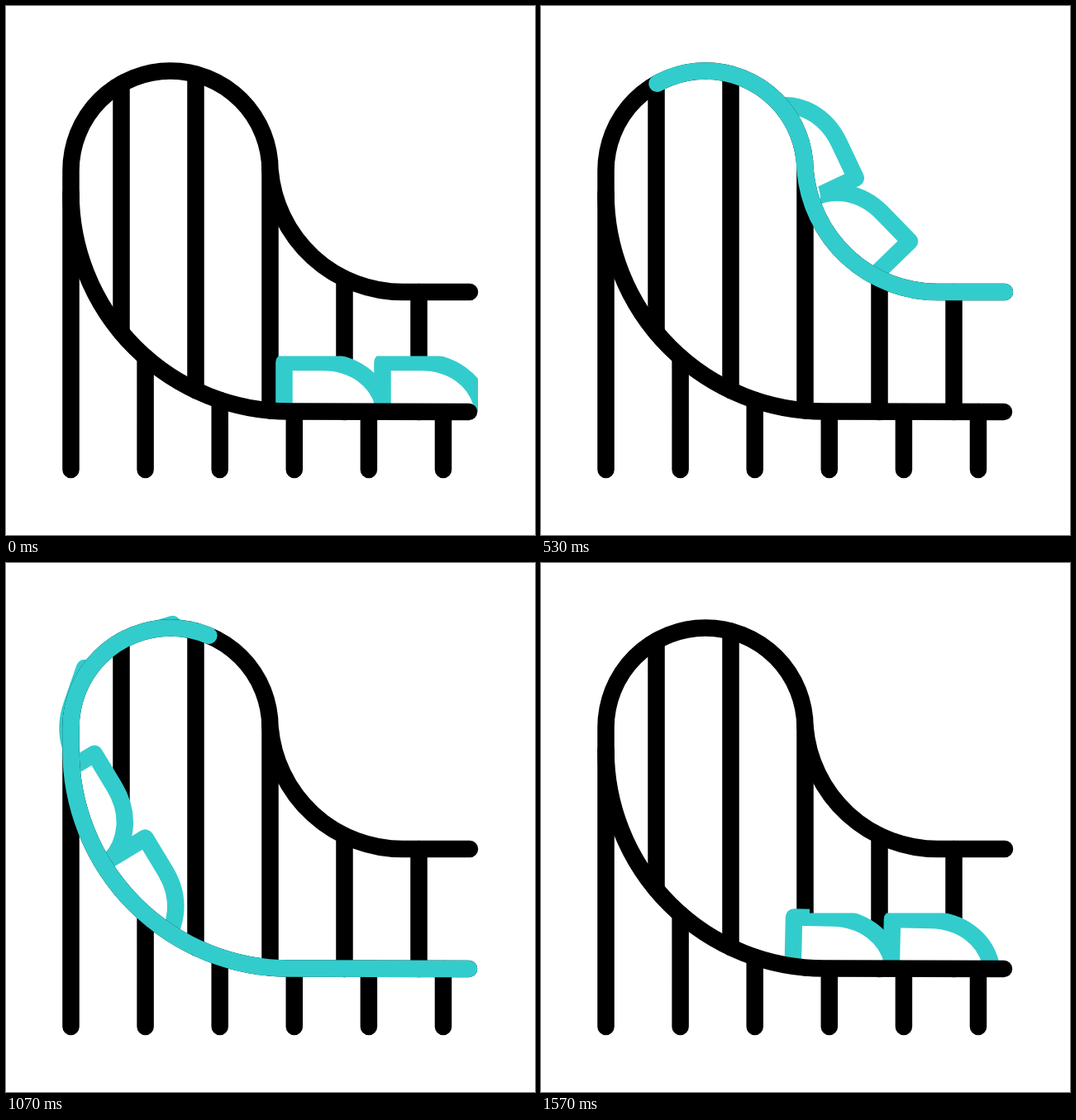
An HTML page with a canvas that plays this animation: 640x640 px, repeating every 1630 ms.

```html
<!DOCTYPE html>
<html>
<head>
<meta charset="utf-8">
<title>Roller coaster</title>
<style>
html, body { margin: 0; width: 100%; height: 100%; overflow: hidden; background: #fff; }
canvas { display: block; width: 640px; height: 640px; }
</style>
</head>
<body>
<canvas id="stage" width="640" height="640"></canvas>
<script>
const ctx = document.getElementById('stage').getContext('2d');
const { PI, sin, cos, exp, sqrt, min, max } = Math;
const LOOP = 1630, TEAL = '#33cccc', LINE = 20.5;

// Track sections: top straight, valley arc, loop arc, drop, base arc, base straight
const VALLEY = 161, TOP = 120.5, BASE = 264.5, LEAN = 1.4837;
const S1 = 81, S2 = S1 + VALLEY * LEAN, S3 = S2 + TOP * PI, S4 = S3 + 27,
      S5 = S4 + BASE * PI / 2, LENGTH = S5 + 217;

const upper = new Path2D();
upper.moveTo(561, 346);
upper.lineTo(480, 346);
upper.arc(480, 185, VALLEY, PI / 2, PI / 2 + LEAN);
upper.arc(199, 199, TOP, 0, PI, true);
upper.lineTo(78.5, 226);
const track = new Path2D(upper);
track.arc(343, 226, BASE, PI, PI / 2, true);
track.lineTo(560, 491);

// Side of the track on which each train shows
const outside = new Path2D(upper);
for (const [x, y] of [[0, 226], [0, 0], [566, 0], [566, 346]]) outside.lineTo(x, y);
const inside = new Path2D(track);
for (const [x, y] of [[571, 491], [571, 423.5], [325, 423.5], [325, 230]]) inside.lineTo(x, y);

// Posts hang between the two levels of the track and stand below the lower one
const upperY = x => x < 319 ? 199 - sqrt(TOP ** 2 - (x - 199) ** 2)
  : x < 480 ? 185 + sqrt(VALLEY ** 2 - (480 - x) ** 2) : 346;
const lowerY = x => x < 343 ? 226 + sqrt(BASE ** 2 - (343 - x) ** 2) : 491;
const posts = new Path2D();
function addPost(x, top, bottom) {
  posts.moveTo(x, top);
  posts.lineTo(x, bottom);
}
for (let i = 0; i < 5; i++) {
  const x = 139.5 + 90 * i;
  addPost(x, upperY(x), lowerY(x));
}
for (let i = 0; i < 6; i++) {
  const x = 78.5 + 90.1 * i;
  addPost(x, lowerY(x), 561);
}

// Rear foot at the origin, travelling right
const car = new Path2D('M0 0V-60H47C85 -60 112 -38 120 -10L123 0');

// Position and heading at a distance along the track
function trackPoint(s) {
  if (s < S1) return [561 - s, 346, PI];
  if (s < S2) {
    const a = (s - S1) / VALLEY;
    return [480 - VALLEY * sin(a), 185 + VALLEY * cos(a), PI + a];
  }
  if (s < S3) {
    const a = (s - S2) / TOP;
    return [199 + TOP * cos(a), 199 - TOP * sin(a), 1.5 * PI - a];
  }
  if (s < S4) return [78.5, 199 + s - S3, PI / 2];
  if (s < S5) {
    const a = (s - S4) / BASE;
    return [343 - BASE * cos(a), 226 + BASE * sin(a), PI / 2 - a];
  }
  return [343 + s - S5, 491, 0];
}

const clamp = (v, lo, hi) => max(lo, min(hi, v));
const ease = u => { u = clamp(u, 0, 1); return u * u * (3 - 2 * u); };

function drawCar(x, y, heading, side = 1) {
  ctx.save();
  ctx.translate(x, y);
  ctx.rotate(heading);
  ctx.scale(1, side);
  ctx.fill(car);
  ctx.stroke(car);
  ctx.restore();
}

function strokeTrack(from, to, color, width = LINE) {
  if (to <= from) return;
  ctx.save();
  ctx.strokeStyle = color;
  ctx.lineWidth = width;
  ctx.setLineDash([to - from, 2 * LENGTH]);
  ctx.lineDashOffset = -from;
  ctx.stroke(track);
  ctx.restore();
}

// Each car follows the upper track, looking ahead, then sinks into the loop
function drawClimbing(t) {
  const depth = 60 * ease((t - 730) / 340) - 10 * ease((t - 530) / 200);
  for (const gap of [0, 123]) {
    const s = 703 - 1267 * exp(-t / 625) + gap;
    const [x, y, h] = trackPoint(s), ahead = s + clamp(0.3 * s, 0, 70);
    const heading = (trackPoint(ahead - 50)[2] + trackPoint(ahead + 50)[2]) / 2;
    drawCar(x + depth * sin(h), y - depth * cos(h), heading, -1);
  }
  strokeTrack(288, 318, '#fff', 25);
}

// Both cars form one rigid train, placed by the foot of the front car
function drawRigid(s, heading) {
  const [x, y] = trackPoint(s);
  for (const gap of [119, 0]) drawCar(x - gap * cos(heading), y - gap * sin(heading), heading);
}

function drawLower(t) {
  if (t < 320) drawRigid(1253 + 0.4 * t + 0.0011 * t * t, 0);
  else if (t > 980) drawRigid(1276.6 - 408 * exp((1070 - t) / 250), min(PI / 2, 1.035 * exp((1070 - t) / 130)));
}

function drawTrain(paint, t, region) {
  ctx.save();
  ctx.clip(region);
  ctx.strokeStyle = TEAL;
  paint(t);
  ctx.restore();
}

function draw(t) {
  ctx.fillStyle = '#fff';
  ctx.fillRect(0, 0, 640, 640);
  ctx.lineWidth = LINE;
  ctx.lineCap = ctx.lineJoin = 'round';
  ctx.strokeStyle = '#000';
  ctx.stroke(posts);
  if (t < 1085) drawTrain(drawClimbing, t, outside);
  drawTrain(drawLower, t, inside);
  ctx.stroke(track);
  strokeTrack(LENGTH * ease((t - 793) / 710), LENGTH * ease((t - 152) / 849), TEAL);
}

const start = performance.now();
function tick() {
  draw((performance.now() - start) % LOOP);
  requestAnimationFrame(tick);
}
tick();
</script>
</body>
</html>
```
